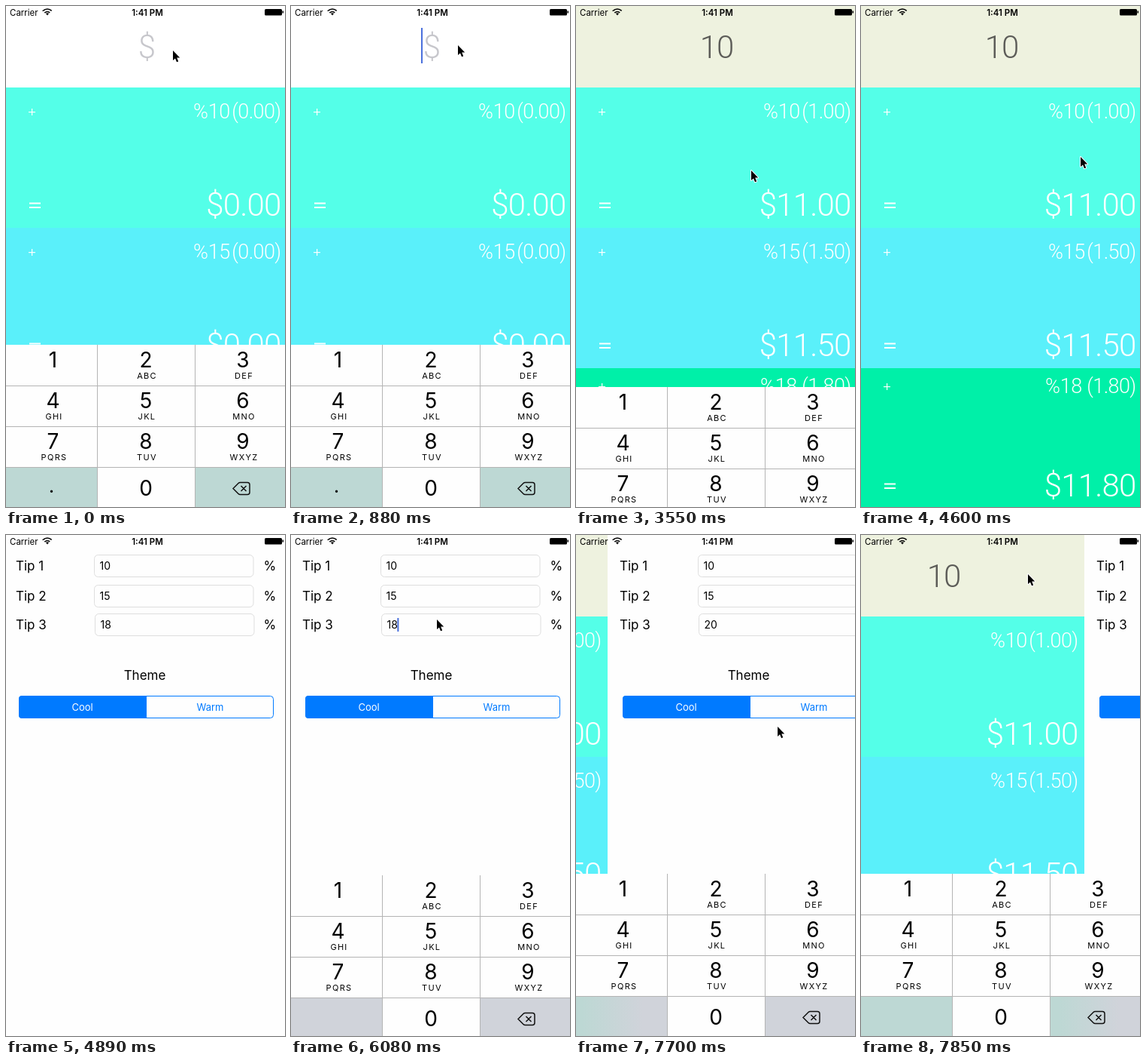
Write an HTML page with a canvas that moves like this. It is 371 px wide and 664 px high and loops after 7990 ms.

```html
<!DOCTYPE html>
<html lang="en">
<head>
<meta charset="utf-8">
<title>Tip calculator</title>
<style>
  html, body { margin: 0; width: 100%; height: 100%; overflow: hidden; background: #fff; }
  canvas { display: block; width: 371px; height: 664px; }
</style>
</head>
<body>
<canvas></canvas>
<script>
const W = 371, H = 664, LOOP = 7990, STEP = 148, PAGE = 375, KEYPAD_TOP = 449;
const canvas = document.querySelector('canvas');
const ctx = canvas.getContext('2d');
const ratio = window.devicePixelRatio || 1;
canvas.width = W * ratio;
canvas.height = H * ratio;

const ui = (size, weight = 400) => `${weight} ${size}px Inter, sans-serif`;
const light = size => `300 ${size}px Roboto, sans-serif`;

// Smooth progress from 0 to 1 between two times.
function ease(t, from, to) {
  const p = Math.min(1, Math.max(0, (t - from) / (to - from)));
  return p * p * (3 - 2 * p);
}
const mix = (a, b, p) => a + (b - a) * p;
const typed = (str, t, start, interval) =>
  str.slice(0, Math.max(0, Math.floor((t - start) / interval) + 1));
const blink = t => t % 888 >= 444;

const cursorStops = [
  { t: 0, x: 222, y: 59 }, { t: 740, x: 222, y: 52 },
  { t: 2516, x: 222, y: 52 }, { t: 2812, x: 233, y: 218 },
  { t: 3700, x: 233, y: 218 }, { t: 4440, x: 292, y: 200 },
  { t: 4588, x: 292, y: 200 }, { t: 4884, x: -30, y: 200 },
  { t: 5480, x: 194, y: 112 }, { t: 7100, x: 194, y: 112 },
  { t: 7548, x: 258, y: 262 }, { t: LOOP - STEP, x: 278, y: 246 }
];

function cursorAt(t) {
  const next = Math.max(1, cursorStops.findIndex(stop => stop.t >= t));
  const a = cursorStops[next - 1], b = cursorStops[next];
  const p = ease(t, a.t, b.t);
  return [mix(a.x, b.x, p), mix(a.y, b.y, p)];
}

// Left edge of the settings page: a springy swipe in, an accelerating swipe out.
function pageAt(t) {
  if (t < 4588) return PAGE;
  if (t > 7548) return Math.round(298 * ((t - 7548) / 296) ** 2.8);
  const u = (t - 4588) / 296;
  return Math.round(PAGE * Math.exp(-4 * u) * Math.cos(1.865 * u));
}

function keypadAt(t) {
  const hidden = t < 5000 ? ease(t, 3404, 3848) : 1 - ease(t, 5930, 6077);
  return Math.round(mix(KEYPAD_TOP, H, hidden));
}

function thirdTipAt(t) {
  const erased = Math.max(0, Math.round((t - 6216) / STEP));
  return t < 6600 ? '18'.slice(0, Math.max(0, 2 - erased)) : typed('20', t, 6660, STEP);
}

function rect(x, y, w, h, color) {
  ctx.fillStyle = color;
  ctx.fillRect(x, y, w, h);
}

function text(str, x, y, font, color = '#000', align = 'left', spacing = 0) {
  ctx.font = font;
  ctx.fillStyle = color;
  ctx.textAlign = align;
  ctx.letterSpacing = spacing + 'px';
  ctx.fillText(str, x, y);
}

function stroke(path, color, width) {
  ctx.strokeStyle = color;
  ctx.lineWidth = width;
  ctx.stroke(path);
}

function roundBox(x, y, w, h, r) {
  const path = new Path2D();
  path.roundRect(x, y, w, h, r);
  return path;
}

function at(x, y, draw) {
  ctx.save();
  ctx.translate(x, y);
  draw();
  ctx.restore();
}

const caret = (x, y, h) => rect(x, y, 2, h, '#4a70dc');

function drawHome(t) {
  const amount = typed('10', t, 1628, 444);
  const value = Number(amount);
  const tint = ease(t, 1924, 2368);
  rect(-1, 0, PAGE, 108, `rgb(${mix(255, 238, tint)}, ${mix(255, 242, tint)}, ${mix(255, 223, tint)})`);
  text(amount || '$', 187, 68.5, light(42), amount ? '#5c5c58' : '#c7c7cc', 'center', -1);
  const typing = t >= 888 && t < 2664;
  if (t < 3552 && (typing || blink(t))) caret(amount ? 186 + amount.length * 11 : 173, 29, 47);

  const rows = [
    { rate: 10, color: '#54ffe8', rateY: 41, rateEnd: 298 },
    { rate: 15, color: '#5af0fa', rateY: 41, rateEnd: 298 },
    { rate: 18, color: '#00f0a8', rateY: 33, rateEnd: 294 }
  ];
  rows.forEach(({ rate, color, rateY, rateEnd }, i) => at(0, 108 + i * 186, () => {
    const tip = value * rate / 100;
    rect(-1, 0, PAGE, 186, color);
    rect(30, rateY - 9, 9, 1.2, '#fff');
    rect(34, rateY - 13, 1.2, 9, '#fff');
    rect(31, 152.5, 15, 2, '#fff');
    rect(31, 158, 15, 2, '#fff');
    text('%' + rate, rateEnd, rateY, light(27), '#fff', 'right', -0.3);
    text(`(${tip.toFixed(2)})`, 365.5, rateY, light(27), '#fff', 'right', -0.6);
    text('$' + (value + tip).toFixed(2), 365.5, 169.5, light(42), '#fff', 'right', -0.8);
  }));
}

function drawSettings(t, page) {
  rect(-1, 0, PAGE + 2, H, '#fefefe');
  const tips = ['10', '15', thirdTipAt(t)];
  [26, 66, 104].forEach((y, i) => {
    const x = i === 2 ? 120 : 119;
    text('Tip ' + (i + 1), 15, y + 21, ui(17));
    stroke(roundBox(x + 0.5, y + 0.5, 211.5, 29, 5), '#dedede', 1);
    text(tips[i], x + 7.5, y + 20, ui(14));
    text('%', 344.5, y + 21, ui(17));
  });
  if (t >= 6068 && page === 0 && blink(t)) {
    ctx.font = ui(14);
    caret(127 + ctx.measureText(tips[2]).width, 110, 18);
  }

  text('Theme', 186.5, 192, ui(17), '#000', 'center');
  ctx.fillStyle = '#007aff';
  ctx.fill(roundBox(19, 213, 170, 30, [4, 0, 0, 4]));
  stroke(roundBox(19.5, 213.5, 338, 29, 4), '#007aff', 1);
  text('Cool', 103.5, 232.5, ui(13), '#fff', 'center');
  text('Warm', 273.5, 232.5, ui(13), '#007aff', 'center');
}

function drawKeypad(top, page, hasPoint) {
  const teal = '#bdd8d4', gray = '#d0d3da', line = '#b4b4b4';
  // The side keys pick up the blurred colour of the page behind them.
  let sideKey = page <= 0 ? gray : teal;
  if (page > 0 && page < PAGE) {
    sideKey = ctx.createLinearGradient(page - 35, 0, page + 45, 0);
    sideKey.addColorStop(0, teal);
    sideKey.addColorStop(1, gray);
  }
  at(0, top, () => {
    rect(0, 0, W, 162, '#fefefe');
    rect(0, 162, W, 60, sideKey);
    rect(122, 162, 129, 60, '#fefefe');
    for (const y of [54, 108, 162]) rect(0, y, W, 1, line);
    for (const x of [121, 251]) rect(x, 0, 1, 222, line);

    const letters = ['', 'ABC', 'DEF', 'GHI', 'JKL', 'MNO', 'PQRS', 'TUV', 'WXYZ'];
    const centers = [62.5, 186, 315];
    letters.forEach((label, i) => {
      const x = centers[i % 3], y = Math.floor(i / 3) * 54;
      text(i + 1, x, y + 30, ui(28), '#000', 'center');
      text(label, x + 1.5, y + 45, ui(11), '#000', 'center', 1.3);
    });
    text('0', 186, 199.5, ui(28), '#000', 'center');
    if (hasPoint) text('.', 60.5, 196, ui(26), '#000', 'center');

    const erase = new Path2D('M302 190.5L309 183.5Q310 182.5 311.5 182.5H321Q324 182.5 324 185.5V195.5Q324 198.5 321 198.5H311.5Q310 198.5 309 197.5ZM312.5 187L319.5 194M319.5 187L312.5 194');
    stroke(erase, '#111', 1.5);
  });
}

function drawStatusBar() {
  text('Carrier', 5, 12.5, ui(11.5));
  text('1:41 PM', 188, 12.5, ui(11.5, 600), '#000', 'center');
  const wifi = new Path2D();
  for (const r of [4.5, 8]) {
    wifi.moveTo(55 - r * 0.7, 12 - r * 0.7);
    wifi.arc(55, 12, r, -Math.PI * 0.75, -Math.PI * 0.25);
  }
  stroke(wifi, '#000', 1.7);
  ctx.fillStyle = '#000';
  ctx.fill(new Path2D('M55 12.5L53 10Q55 8.6 57 10Z'));
  ctx.fill(roundBox(344, 4, 23, 8.5, 1.5));
  rect(367.5, 6.5, 1.5, 3, '#000');
}

const arrow = new Path2D('M0 0V13L3 10.4L5 15.3L7.2 14.4L5.2 9.6H9.2Z');
function drawCursor(x, y) {
  at(x, y, () => {
    ctx.lineJoin = 'round';
    stroke(arrow, '#fff', 2);
    ctx.fillStyle = '#000';
    ctx.fill(arrow);
  });
}

const start = performance.now();
function frame() {
  const elapsed = (performance.now() - start) % LOOP;
  const t = Math.floor((elapsed + 20) / STEP) * STEP;
  const page = pageAt(t), keypadTop = keypadAt(t);
  ctx.setTransform(ratio, 0, 0, ratio, 0, 0);
  rect(0, 0, W, H, '#fefefe');
  at(page - PAGE, 0, () => drawHome(t));
  if (page < PAGE) at(page, 0, () => drawSettings(t, page));
  if (keypadTop < H) drawKeypad(keypadTop, page, t < 4588);
  drawStatusBar();
  drawCursor(...cursorAt(t));
  requestAnimationFrame(frame);
}
frame();
</script>
</body>
</html>
```
